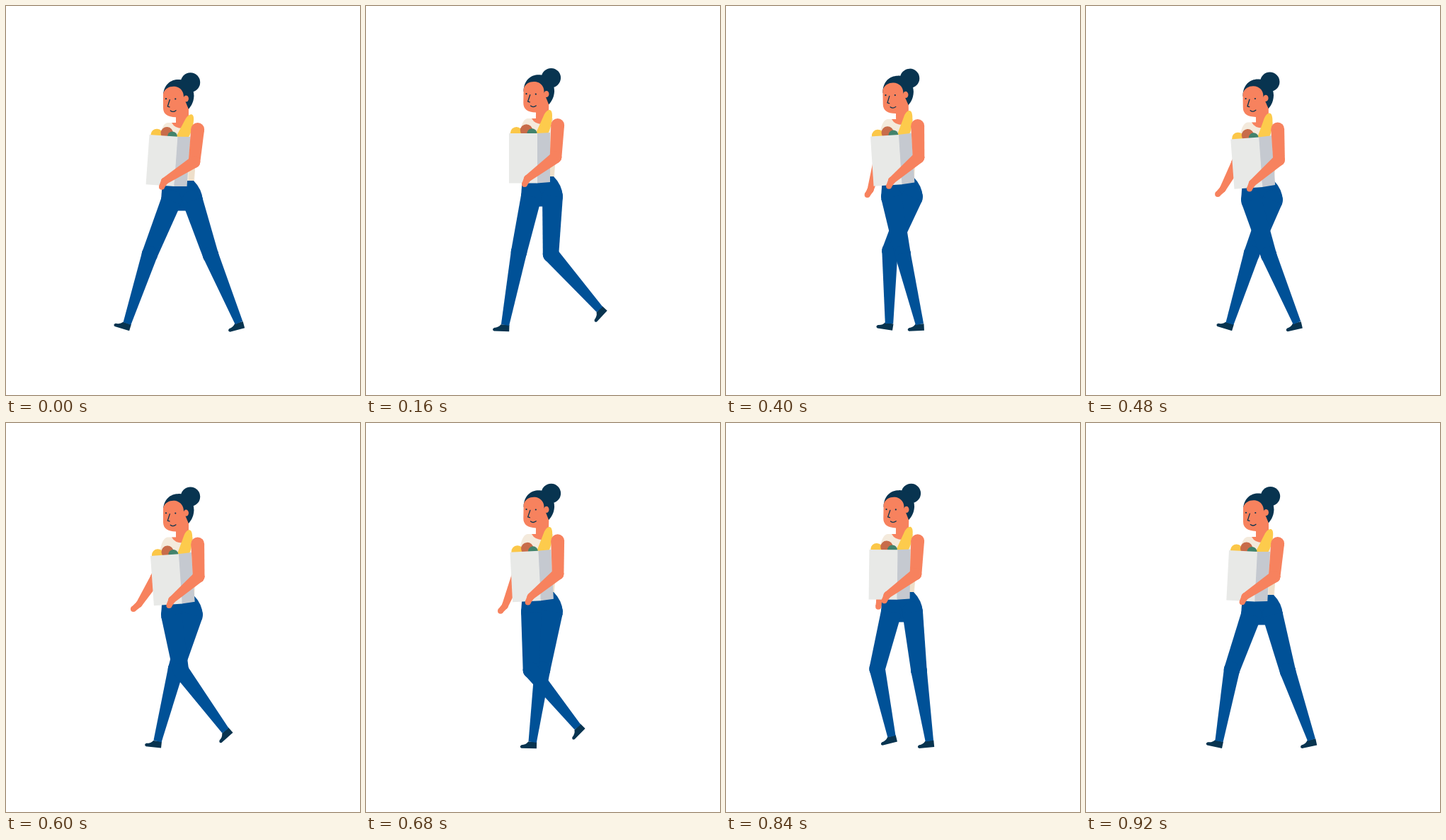
An HTML page with a canvas for the animation above (0.96 s loop, 500 by 550 pixels).

```html
<!DOCTYPE html>
<html lang="en">
<head>
<meta charset="utf-8">
<title>Walking home with groceries</title>
<style>
  html, body { margin: 0; width: 100%; height: 100%; overflow: hidden; background: #fff; }
  canvas { display: block; }
</style>
</head>
<body>
<canvas width="500" height="550"></canvas>
<script>
const ctx = document.querySelector('canvas').getContext('2d');
const LOOP = 960, STEP = 40;
const SKIN = '#f7825e', DARK = '#083450', PANTS = '#005197', SHIRT = '#f4eadc';

// Pose times; every track below has one value per time.
const TIMES = [0, 160, 280, 400, 480, 600, 660, 760, 920];
const nearLeg = {
  kneeX: [203, 216, 236.5, 249.5, 258, 247, 236, 222, 206],
  kneeY: [351, 348, 346, 350, 352, 350, 350, 347, 349],
  ankleX: [171, 196.5, 242, 273.5, 298, 310, 303, 276.5, 188],
  ankleY: [449, 451, 451, 450, 448, 435, 429.5, 436, 450],
  foot: [17, 2, 0, -3, -13, -42, -46, -38, 12]
};
const farLeg = {
  kneeX: [289, 261, 239.5, 231.5, 234, 240, 246.5, 260, 285],
  kneeY: [352, 351, 348, 346, 350, 348, 348.5, 350, 351],
  ankleX: [329, 330, 284, 230.5, 203, 214, 230, 257, 318.5],
  ankleY: [448, 429, 437, 449, 449, 450, 451, 451, 448],
  foot: [-15, -47, -27, 9, 17, 6, 2, 0, -12]
};
const torso = {
  bob: [0, -6, -10, -5, -0.5, -3.5, -7, -10.3, -4],
  nod: [0, 1, 1.2, -1, -0.8, 0, 0.8, 1.8, 0]
};
const bag = {
  x: [202.5, 202, 203, 204, 204.3, 204, 203.6, 203, 202],
  y: [182, 180, 180, 184.5, 188.5, 188, 184, 179, 180],
  tilt: [4, 0, -2.5, -3.7, -4.2, -4, -3.2, -1.5, 3]
};
const freeArm = {
  x: [226, 236, 226, 204, 193, 188, 193, 210, 222],
  y: [236, 232, 238, 260, 259, 256, 258, 260, 243]
};

// Smooth periodic curve through a track.
function sample(track, t) {
  const n = TIMES.length;
  const time = i => TIMES[(i + n) % n] + LOOP * Math.floor(i / n);
  const value = i => track[(i + n) % n];
  const slope = i => (value(i + 1) - value(i - 1)) / (time(i + 1) - time(i - 1));
  let i = n - 1;
  while (TIMES[i] > t) i--;
  const span = time(i + 1) - time(i), u = (t - time(i)) / span, v = 1 - u;
  return value(i) * v * v * (1 + 2 * u) + value(i + 1) * u * u * (3 - 2 * u)
    + span * u * v * (slope(i) * v - slope(i + 1) * u);
}

function pose(tracks, t) {
  const result = {};
  for (const key in tracks) result[key] = sample(tracks[key], t);
  return result;
}

function fill(color, path) {
  ctx.fillStyle = color;
  ctx.fill(new Path2D(path));
}

function disc(color, x, y, r) {
  ctx.fillStyle = color;
  ctx.beginPath();
  ctx.arc(x, y, r, 0, 7);
  ctx.fill();
}

// Tapered limb, round at the start and optionally at the end.
function limb(color, x1, y1, r1, x2, y2, r2, roundEnd = true) {
  const len = Math.hypot(x2 - x1, y2 - y1);
  const nx = (y1 - y2) / len, ny = (x2 - x1) / len;
  disc(color, x1, y1, r1);
  if (roundEnd) disc(color, x2, y2, r2);
  fill(color, `M${x1 + nx * r1} ${y1 + ny * r1}L${x2 + nx * r2} ${y2 + ny * r2}
    L${x2 - nx * r2} ${y2 - ny * r2}L${x1 - nx * r1} ${y1 - ny * r1}Z`);
}

function place(x, y, degrees, draw) {
  ctx.save();
  ctx.translate(x, y);
  ctx.rotate(degrees * Math.PI / 180);
  draw();
  ctx.restore();
}

function drawLeg(leg, hipX, hipY) {
  place(leg.ankleX, leg.ankleY, leg.foot, () =>
    fill(DARK, 'M-6-.5H6V9H-15.5Q-19 7-15.5 4.5Q-9 4-6-.5Z'));
  limb(PANTS, hipX, hipY, 14.5, leg.kneeX, leg.kneeY, 11.2);
  limb(PANTS, leg.kneeX, leg.kneeY, 11.2, leg.ankleX, leg.ankleY, 5.7, false);
}

function drawFreeArm({ x, y }, bob) {
  const elbowX = 155 + x * 0.3, elbowY = 223 + bob;
  limb(SKIN, 232, 180 + bob, 8, elbowX, elbowY, 8);
  limb(SKIN, elbowX, elbowY, 8, x, y, 4.5);
  limb(SKIN, x, y, 4.5, x - 3 - (210 - x) * 0.23, y + 7, 4);
}

function drawBody() {
  fill(SHIRT, 'M217 190Q219 167 228 165H264L268 215L266 250H221Z');
  fill('#eedfca', 'M258 220H268L265 248H258Z');
  fill(SKIN, 'M234 165H258V172Q240 176 234 165Z');
  fill(PANTS, 'M221 247H265Q277 259 278 275L263 289.5H233L219 275Z');
}

function drawHead() {
  disc(DARK, 260.5, 108, 13.7);
  fill(DARK, 'M222 128C222 111 233 104 243 104C258 103 265.5 115 265.5 127C265 138 260 143 257 147L243 135Z');
  fill(SKIN, 'M222 124C225 114 236 112 243 115C249 118 251 123 251 129L253 134L258 146V168H240V157.3Q222 157 222 144Z');
  ctx.save();
  ctx.translate(254.3, 131);
  ctx.scale(0.8, 1);
  disc(SKIN, 0, 0, 4.6);
  ctx.restore();
  disc(DARK, 226, 131.2, 1.1);
  disc(DARK, 239.3, 131.4, 1.1);
  ctx.strokeStyle = DARK;
  ctx.lineWidth = 1.3;
  ctx.lineCap = ctx.lineJoin = 'round';
  ctx.stroke(new Path2D('M231.3 132.5L228.3 142L231 142.8M232.3 148Q236 151 240 147.7'));
}

function drawBag() {
  fill('#fdcb4c', 'M36 4C41-7 45-16 49-25C53-34 61-37 61-25C61-14 58-4 53 4Z');
  disc('#fbc748', 10.5, -0.5, 8.6);
  disc('#c86c4a', 24.5, -4, 8.7);
  disc('#42836c', 32.5, 0.2, 7);
  fill('#c5c9d0', 'M39.5 0L58-1V69L39.5 70.5Z');
  fill('#e8e9e7', 'M0 0H40V70.5H0Z');
}

function draw(t) {
  const { bob, nod } = pose(torso, t);
  const load = pose(bag, t);
  const hipY = 275 + bob;

  ctx.clearRect(0, 0, 500, 550);
  drawFreeArm(pose(freeArm, t), bob);
  place(0, bob, 0, drawBody);
  drawLeg(pose(farLeg, t), 263.5, hipY);
  drawLeg(pose(nearLeg, t), 233.5, hipY);
  place(250, 160 + bob * 1.1, nod, () => {
    ctx.translate(-250, -160);
    drawHead();
  });
  place(load.x, load.y, load.tilt, drawBag);

  // The carrying arm is held against the bag.
  const angle = load.tilt * Math.PI / 180, c = Math.cos(angle), s = Math.sin(angle);
  const onBag = (x, y) => [load.x + x * c - y * s, load.y + x * s + y * c];
  const elbow = onBag(66, 34), wrist = onBag(26, 64);
  limb(SKIN, 270.7, 174.5 + bob, 9.4, ...elbow, 8.3);
  limb(SKIN, ...elbow, 8.3, ...wrist, 5);
  limb(SKIN, ...wrist, 5, wrist[0] - 4, wrist[1] + 8, 4);
}

const start = performance.now();
function tick() {
  const elapsed = (performance.now() - start) % LOOP;
  draw(Math.floor(elapsed / STEP) * STEP);
  requestAnimationFrame(tick);
}
tick();
</script>
</body>
</html>
```
